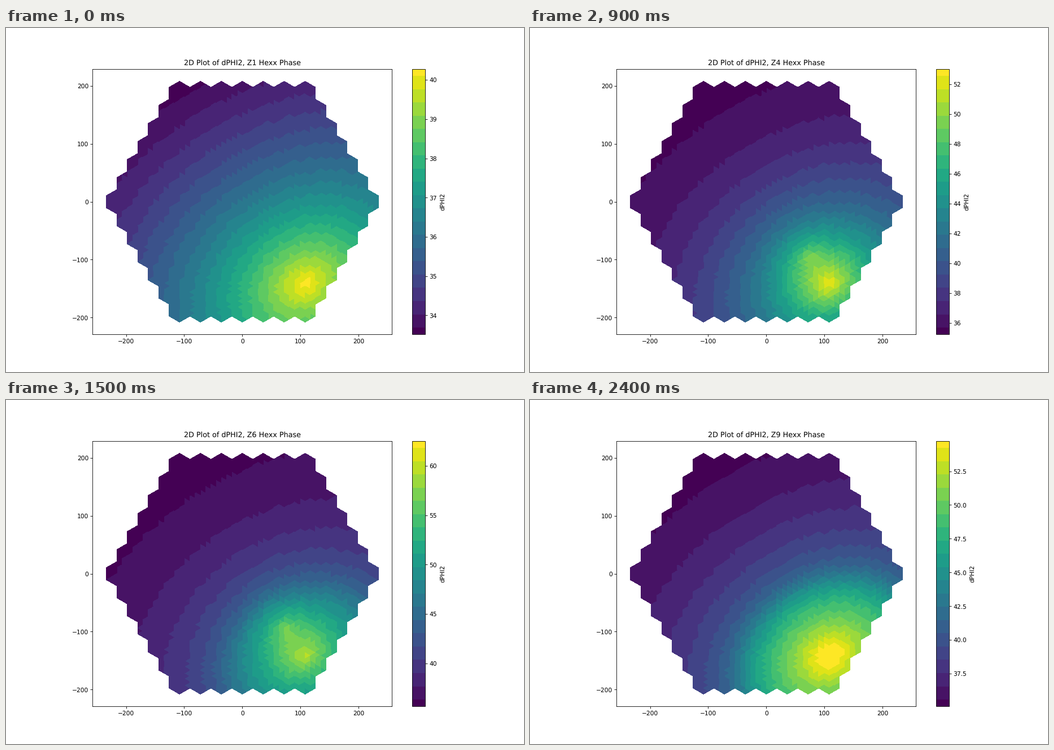
Write a matplotlib script that moves like this. It is 917 px wide and 611 px high and loops after 2700 ms.

```python
import numpy as np
import matplotlib.pyplot as plt
from matplotlib.animation import FuncAnimation
from matplotlib.collections import PolyCollection
from matplotlib.colors import ListedColormap

DPI = 76.375
PITCH = 36.0
RINGS = 6
STEPS = 20
LAYERS = range(1, 10)
SOURCE = np.array([72.0, -94.0])

# Colour range of each layer.
LOWS = [33.52, 34.10, 34.77, 35.25, 35.63, 35.65, 35.60, 35.35, 35.09]
HIGHS = [40.27, 42.30, 45.34, 53.01, 81.53, 62.50, 58.26, 56.00, 54.72]

plt.rcParams["font.family"] = "DejaVu Sans"
plt.rcParams["text.hinting"] = "none"


def hex_centres():
    for row in range(-RINGS, RINGS + 1):
        count = 2 * RINGS + 1 - abs(row)
        for i in range(count):
            yield np.array([(i - (count - 1) / 2) * PITCH,
                            row * PITCH * np.sqrt(3) / 2])


def hex_triangles(centre):
    """Split a pointy-top hexagon into 24 equal triangles."""
    angles = np.radians(30 + 60 * np.arange(7))
    corners = centre + PITCH / np.sqrt(3) * np.c_[np.cos(angles), np.sin(angles)]
    for a, b in zip(corners, corners[1:]):
        ca, cb, ab = (centre + a) / 2, (centre + b) / 2, (a + b) / 2
        yield from ((centre, ca, cb), (ca, a, ab), (cb, ab, b), (ca, ab, cb))


def stepped_viridis():
    """Viridis rounded to whole steps, so both end bands are half as tall."""
    rounded = (np.arange(2 * STEPS) + 1) // 2 / STEPS
    return ListedColormap(plt.get_cmap("viridis")(rounded))


def spread_distance(points):
    """Elliptic distance, centred between the source and the nearest corner."""
    dx, dy = (points - SOURCE).T
    along = -0.5 * dx + np.sqrt(0.75) * dy + 60
    across = np.sqrt(0.75) * dx + 0.5 * dy - 8
    return np.hypot(along, 0.8 * across)


def layer_field(layer):
    """Exponential decay, a peak around layer 5 and a plateau above it."""
    decay = np.exp(-distance / np.interp(layer, [1, 4, 5, 9], [275, 130, 125, 150]))
    height = np.interp(layer, [3, 4, 5, 7], [20, 18, 11, 17])
    base = height * (decay - decay.min()) / np.ptp(decay)

    offset = abs(layer - 5)
    peak = 11 * max(0, 1 - 0.55 * offset) * np.exp(-radius / (25 + 20 * offset))

    edge = 115 + 5 * max(0, layer - 7)
    plateau = 4.5 * np.clip((layer - 5) / 2, 0, 1) / (1 + np.exp((distance - edge) / 14))

    low, high = LOWS[layer - 1], HIGHS[layer - 1]
    share = np.clip((base + peak + plateau) / STEPS, 0, 1)
    return (low, high), low + share * (high - low)


triangles = np.array([t for c in hex_centres() for t in hex_triangles(c)])
centroids = triangles.mean(axis=1)
distance = spread_distance(centroids)
radius = np.hypot(*(centroids - SOURCE).T)
fields = [layer_field(layer) for layer in LAYERS]

fig, ax = plt.subplots(figsize=(917.001 / DPI, 611.001 / DPI), dpi=DPI)
mesh = PolyCollection(triangles, cmap=stepped_viridis(),
                      edgecolors="none", antialiased=False)
mesh.set_array(fields[0][1])
mesh.set_clim(*fields[0][0])
ax.add_collection(mesh)
x_max, y_max = 1.1 * np.abs(triangles).max(axis=(0, 1))
ax.set(xlim=(-x_max, x_max), ylim=(-y_max, y_max), aspect="equal")
ax.set_xticks(range(-200, 201, 100))
ax.set_yticks(range(-200, 201, 100))
title = ax.set_title("")
fig.colorbar(mesh, ax=ax, label="dPHI2")


def update(index):
    limits, values = fields[index]
    mesh.set_array(values)
    mesh.set_clim(*limits)
    title.set_text(f"2D Plot of dPHI2, Z{LAYERS[index]} Hexx Phase")
    return mesh, title


anim = FuncAnimation(fig, update, frames=len(fields), interval=300,
                     repeat=True, repeat_delay=0, blit=False)
plt.show()
```
